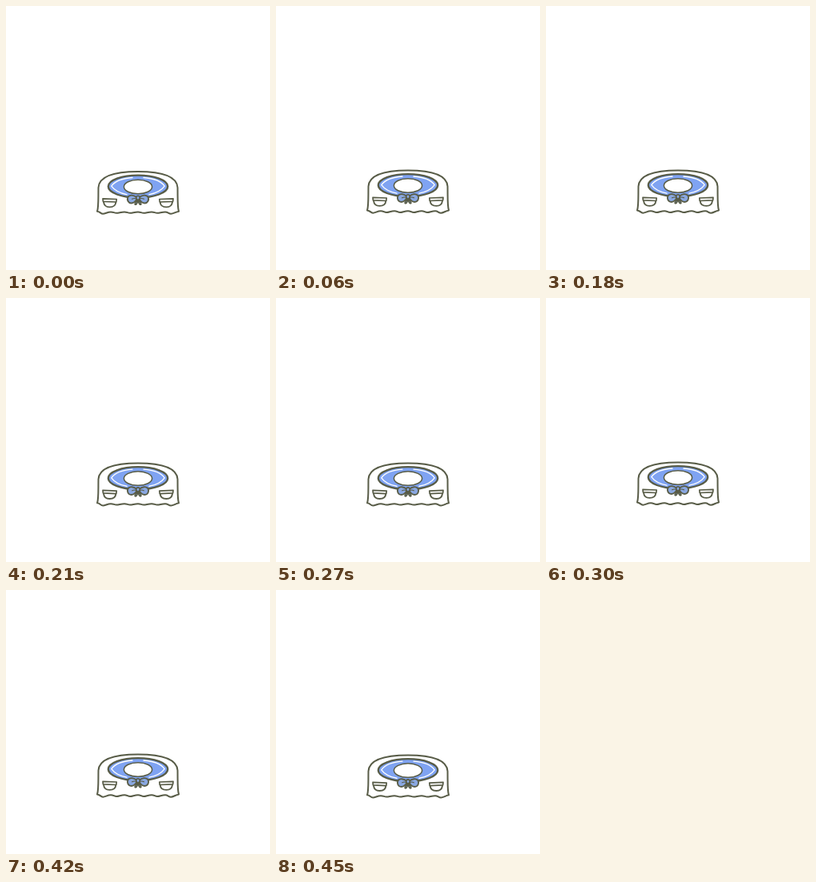
Recreate the animation shown at these times as an HTML page with a canvas. Size 330 px wide and 330 px high, loop 0.48 s.

```html
<!DOCTYPE html>
<html lang="en">
<head>
<meta charset="utf-8">
<title>Breathing smock</title>
<style>
  html, body { margin: 0; width: 100%; height: 100%; overflow: hidden; background: #fff; }
  canvas { display: block; width: 330px; height: 330px; }
</style>
</head>
<body>
<canvas id="stage" width="330" height="330"></canvas>
<script>
const ctx = document.getElementById('stage').getContext('2d');
const INK = '#585c47', BLUE = '#7fa3f2', BOW = '#8aa8e2', WHITE = '#fff';
const CENTER = 165, STEP = 30, STEPS = 8;

function paint(path, fill, width, stroke = INK) {
  if (fill) { ctx.fillStyle = fill; ctx.fill(path); }
  ctx.lineWidth = width;
  ctx.strokeStyle = stroke;
  ctx.stroke(path);
}

function oval(y, rx, ry) {
  const path = new Path2D();
  path.ellipse(CENTER, y, rx, ry, 0, 0, Math.PI * 2);
  return path;
}

// Draws a part on the left and again mirrored on the right.
function mirrored(draw) {
  for (const side of [1, -1]) {
    ctx.save();
    ctx.translate(CENTER, 0);
    ctx.scale(side, 1);
    draw();
    ctx.restore();
  }
}

function drawBody(lift) {
  const top = 207 - lift;
  const hem = 256.7 - lift * 0.85;
  const body = new Path2D();
  body.moveTo(114, hem);
  body.bezierCurveTo(115.8, hem - 5, 115.3, top + 36, 115.5, top + 20);
  body.bezierCurveTo(116.5, top + 4, 140, top, CENTER, top);
  body.bezierCurveTo(190, top, 213.5, top + 4, 214.5, top + 20);
  body.bezierCurveTo(214.7, top + 36, 214.2, hem - 5, 216, hem);
  const waves = 6, width = 102 / waves;
  for (let i = 0; i < waves; i++) {
    const x = 216 - i * width;
    const outer = i === 0 || i === waves - 1;
    const tip = (outer ? 259.8 : 258.7) - lift * (outer ? 0.75 : 0.4);
    const next = hem + (i < waves - 1 ? 0.8 : 0);
    body.bezierCurveTo(x - width * 0.25, hem + 0.8, x - width * 0.4, tip, x - width * 0.58, tip);
    body.bezierCurveTo(x - width * 0.75, tip, x - width * 0.8, next, x - width, next);
  }
  body.closePath();
  paint(body, WHITE, 2);
}

function drawCollar() {
  paint(oval(225.6, 37.2, 14), BLUE, 2.4);
  mirrored(() => {
    paint(new Path2D('M-7 214.5C-20 215.5 -29 219 -33.2 225.2C-29 231 -23 234 -14 235.7'), null, 1.3, WHITE);
  });
  paint(oval(226, 17.6, 8.8), WHITE, 1.5);
}

function drawBow() {
  mirrored(() => {
    paint(new Path2D('M-0.5 242C-2 244 -4.5 246.5 -3.7 248C-2.5 249 -1 247 -0.5 244Z'), BOW, 1.7);
    paint(new Path2D('M-1.5 239.5C-5 236 -10.5 235.5 -12.7 239C-14.2 242.5 -12 246.5 -8.5 246.5C-5.5 246.5 -3 244 -1.5 241.5Z'), BOW, 1.9);
    paint(new Path2D('M-2.5 240.8C-4.5 240.2 -6 240.5 -7.5 241.3'), null, 1.1);
  });
  paint(oval(239.8, 2.2, 2.5), BOW, 1.6);
}

function drawPockets() {
  mirrored(() => {
    paint(new Path2D('M-43 245C-42.5 249.5 -40 251.4 -35.5 251.4C-30.5 251.4 -28 249.3 -27.7 245.3'), WHITE, 1.9);
    paint(new Path2D('M-44 240.8L-26.8 241.5L-27.2 245L-43.6 244.4Z'), WHITE, 1.7);
  });
}

function render(time) {
  const step = Math.floor(time / STEP) % STEPS;
  const lift = 1.5 * (1 - Math.cos(step / STEPS * Math.PI * 2));
  ctx.fillStyle = WHITE;
  ctx.fillRect(0, 0, 330, 330);
  ctx.lineJoin = ctx.lineCap = 'round';
  drawBody(lift);
  ctx.save();
  ctx.translate(0, -lift);
  drawCollar();
  drawPockets();
  drawBow();
  ctx.restore();
}

const start = performance.now();
function tick() {
  render(performance.now() - start);
  requestAnimationFrame(tick);
}
tick();
</script>
</body>
</html>
```
